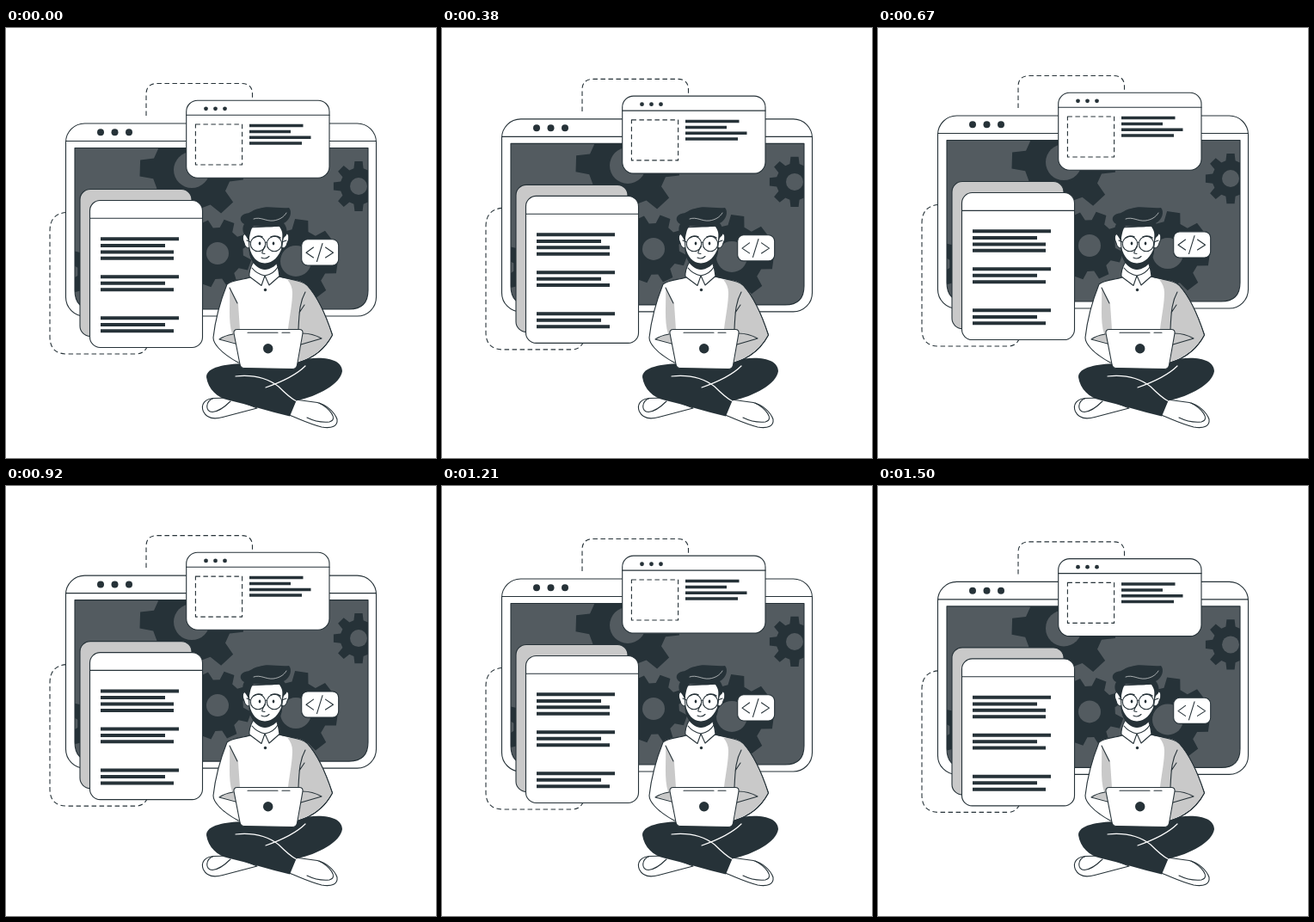
Write an HTML page that moves like this. It is 500 px wide and 500 px high and loops after 1540 ms.

```html
<!DOCTYPE html>
<html lang="en">
<head>
<meta charset="utf-8">
<title>Developer at work</title>
<style>
  html, body { margin: 0; width: 100%; height: 100%; overflow: hidden; background: #fff; }
  svg { display: block; width: 100%; height: 100%; }
  .line { fill: none; stroke: #263238; stroke-width: 1.1; stroke-linecap: round; stroke-linejoin: round; }
  .paper { fill: #fff; stroke: #263238; stroke-width: 1.1; stroke-linejoin: round; }
  .dark { fill: #263238; }
  .grey { fill: #c9c9c9; }
  .screen { fill: #535b60; }
  .dash { stroke-dasharray: 5.5 3.5; stroke-linecap: butt; }
  .bar { fill: none; stroke: #263238; }
  .crease { fill: none; stroke: #fff; stroke-width: 1.2; stroke-linecap: round; }
  .thin { stroke-width: .6; }
  .thick { stroke-width: 1.5; }
</style>
</head>
<body>
<svg viewBox="0 0 500 500">
  <defs>
    <clipPath id="screenClip"><path id="screenShape" d="M80 139.500H421V305Q421 327 399 327H102Q80 327 80 305Z"/></clipPath>
  </defs>

  <g id="windows">
    <path class="line dash" d="M163 102V77Q163 64.500 176 64.500H274Q286.500 64.500 286.500 77V84"/>
    <path class="line dash" d="M70 214.500Q51 216 51 236V359Q51 379 71 379H151Q160 379 164 371"/>

    <rect class="paper" x="69.500" y="111" width="361" height="224" rx="22"/>
    <path class="line" d="M69.500 131.500H430.500"/>
    <g class="dark"><circle cx="110" cy="121.300" r="4"/><circle cx="126.500" cy="121.300" r="4"/><circle cx="143" cy="121.300" r="4"/></g>
    <use href="#screenShape" class="screen"/>
    <g id="gears" clip-path="url(#screenClip)"></g>
    <use href="#screenShape" class="line"/>

    <rect class="grey" x="86" y="187.500" width="130" height="171" rx="12" stroke="#263238" stroke-width="1.1"/>
    <rect class="paper" x="97.500" y="200.500" width="131" height="171" rx="12"/>
    <path class="line" d="M97.500 221.300H228.500"/>
    <path class="bar" stroke-width="4" d="M110 245.300H201M110 253H185M110 260.400H195M110 267.800H195
      M110 289.300H201M110 296.800H185M110 304.200H195M110 337.300H201M110 344.900H185M110 352.300H195"/>

    <rect class="paper" x="209.700" y="84.200" width="166.300" height="90" rx="13"/>
    <path class="line" d="M209.700 101.200H376"/>
    <g class="dark"><circle cx="232.500" cy="93.800" r="2.400"/><circle cx="243.500" cy="93.800" r="2.400"/><circle cx="254.500" cy="93.800" r="2.400"/></g>
    <rect class="line dash" x="220.400" y="112" width="54.200" height="47"/>
    <path class="bar" stroke-width="3.500" d="M283 113.500H345.500M283 120.500H331M283 127.300H354.500M283 134H344"/>

    <rect class="paper" x="343.700" y="245.800" width="43" height="30.200" rx="7"/>
    <path class="line" d="M357.500 255L349 261.200L357.500 267M368 250.500L361.500 271.500M371.500 255L380.500 261.200L371.500 267"/>
  </g>

  <g id="person">
    <!-- shoes and legs -->
    <path class="paper" d="M262 430L242 430.500C231 431 226 438 229.500 446C234 455 243 455 252 452.500L292 442Z"/>
    <path class="line" d="M241 430.500C232 434 231 446 240 446.500C247 446 255 440 261 434"/>
    <path class="paper" d="M336 432L362 435.500C372 438 382 446 385 455C386 463 379 466 367 464C354 461 342 455 329 450Z"/>
    <path class="line" d="M364 436C376 442 387 455 376 458C366 459 356 456 350 453"/>
    <path class="dark" d="M276 390C255 391 233 394 233 406C235 420 246 430 258 432.500C282 438 306 446 330 451.500L337.500 433.500C363 428 389 414 391 399C391 384 366 380 338 387Z"/>
    <path class="crease" d="M267 405C286 403 304 407 317 417C324 424 330 430 337 433.500M348 393C339 402 322 411 302 418"/>

    <!-- shirt -->
    <path class="paper" d="M284 290C274 293 262 293 257 298C249 318 243 342 241 360C241 366 248 377 270 389H340C357 384 371 373 379.500 357C372 334 361 311 350 299C344 293 329 292 318 289Z"/>
    <path class="grey" d="M260 303L270 321L272 351H265L268 366L248 361.500L263 356C258 340 261 320 260 303Z"/>
    <path class="grey" d="M327 292.500C340 293 346 295 350 299.500C361 312 372 334 379 357C371 372 357 383 340 388L344 361L345 352L328 350C330 334 333 320 333 308C333 302 331 297 327 292.500Z"/>
    <path class="line" d="M318 289C331 293 344 293 350 299C361 311 372 334 379.500 357C371 373 357 384 340 389"/>
    <path class="line" d="M260 302L269 320M264 356C258 357 252 359 248 362M248 362L267 367M348 307C342 318 341 328 340 350M347 322L341 331M344 355C353 355 360 357 367 361M367 361L343 368"/>

    <!-- neck and collar -->
    <path class="paper" d="M287 273C284 279 282.500 284 283 289L297 299.500L301 288L306 299L318 288.500C317.500 283 316.500 278 314.500 273Z"/>
    <path class="line" d="M286 279C290 284 296 287 301 288C307 287 313 283 316 278"/>
    <circle class="dark" cx="301.500" cy="304.500" r="1.700"/>

    <!-- head -->
    <path class="paper" d="M281 240C275 237 274 244 277 250C278 255 281 257 284 255ZM323 240C330 236 330 245 327 250C326 255 323 257 320 255Z"/>
    <path class="paper" d="M282 232L283 259C284 270 292 279 301 280C311 279 319 270 320.500 259L323 230Z"/>
    <path class="dark" d="M283 255C286 266 291 273 301 273.500C311 273 317 266 321 255C322 268 314 280 301 281C290 280 282 269 283 255Z"/>
    <path class="dark" d="M279 242C274 237 275 231 277 228C270 224 272 217 280 215.500C285 215 287 211 294 210C304 206 316 210 329 209C333 213 331 223 323 227C327 232 327 237 326 241L322 245C322 238 320 233 317 230C307 233 296 230 288 230C284 234 284 241 282 247Z"/>
    <path class="crease thin" d="M288 222C296 219 302 225 311 224C318 223 323 220 326 215"/>
    <g class="line">
      <circle cx="293" cy="251" r="8.700"/><circle cx="312" cy="251" r="8.700"/>
      <path d="M301.500 249.500Q302.500 248.500 303.500 249.500M284.500 249L280 247M320.700 249L326 247M301.500 253C300 257 297 260 298 262L301 262.500M297 267Q302 269.500 306 265.500"/>
      <path class="thick" d="M288 244Q293 240.500 298 243M308 243Q314 240.500 319 244"/>
    </g>
    <g class="dark"><ellipse cx="295" cy="250.500" rx="1.300" ry="2"/><ellipse cx="311" cy="250.500" rx="1.300" ry="2"/></g>

    <!-- laptop -->
    <path class="paper" d="M269 350.500H341Q345.500 350.500 345 355L338.500 392Q337.500 396.500 333 396.500L277 395.500Q273 395.500 272 391L265 355Q264.500 350.500 269 350.500Z"/>
    <path class="line" d="M281 354.300H316M321 354.300H330"/>
    <circle class="dark" cx="304.700" cy="372.700" r="5.700"/>
  </g>
</svg>
<script>
  const LOOP = 1540, PEAK = 720, HALF = 750, RISE = 10, REST = 0.4;

  // Eight-toothed gear with a round hole; turn is in degrees.
  function gear(x, y, outer, inner, hole, turn) {
    const points = [];
    for (let i = 0; i < 8; i++) {
      for (const [offset, radius] of [[-15, inner], [-9, outer], [9, outer], [15, inner]]) {
        const a = (i * 45 + turn + offset) * Math.PI / 180;
        points.push(`${(x + radius * Math.cos(a)).toFixed(1)} ${(y + radius * Math.sin(a)).toFixed(1)}`);
      }
    }
    return `<path class="dark" d="M${points.join('L')}Z"/><circle class="screen" cx="${x}" cy="${y}" r="${hole}"/>`;
  }

  document.getElementById('gears').innerHTML =
    gear(216, 165, 61, 46, 21, 2) +
    gear(246, 262, 40, 30, 13, 20) +
    gear(337, 271, 49, 37, 18, 8) +
    gear(410, 184, 29.5, 21.5, 10, 0) +
    gear(118, 283, 46, 35, 14, 22);

  const windows = document.getElementById('windows');
  const start = performance.now();

  // The windows rise and sink at constant speed, pausing briefly at the bottom.
  function draw() {
    const t = (performance.now() - start) % LOOP;
    const drop = Math.min(1, Math.abs(t - PEAK) / HALF);
    windows.setAttribute('transform', `translate(0 ${(REST - RISE * (1 - drop)).toFixed(2)})`);
    requestAnimationFrame(draw);
  }
  draw();
</script>
</body>
</html>
```
